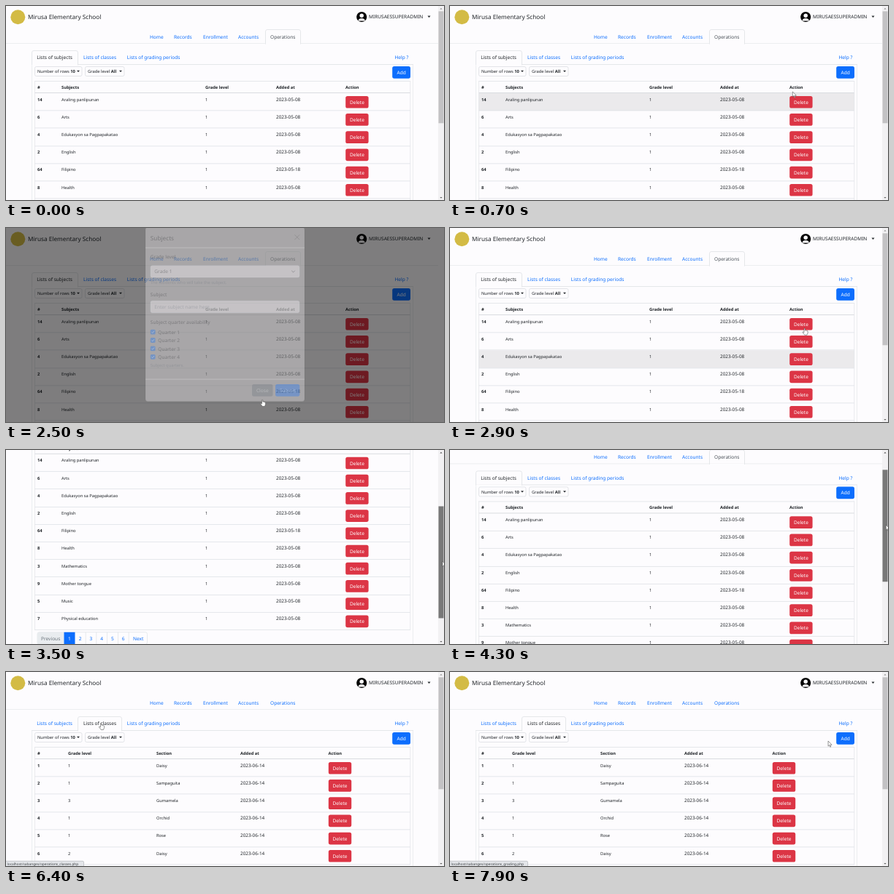
An HTML page with a canvas that plays this animation: 600 px wide and 267 px high, repeating every 8 s.

```html
<!DOCTYPE html>
<html lang="en">
<head>
<meta charset="utf-8">
<title>School records</title>
<style>
html, body { margin: 0; width: 100%; height: 100%; overflow: hidden; background: #fdfcfe; }
canvas { display: block; width: 600px; height: 267px; }
</style>
</head>
<body>
<canvas id="stage"></canvas>
<script>
const W = 600, H = 267, LOOP = 8000;
const canvas = document.getElementById('stage');
const dpr = window.devicePixelRatio || 1;
canvas.width = W * dpr;
canvas.height = H * dpr;
const c = canvas.getContext('2d');
c.textRendering = 'geometricPrecision';

const PAGE = '#fdfcfe', INK = '#212529', BLUE = '#0d6efd', RED = '#dc3545', GRAY = '#6c757d', LINE = '#e5e7ea';
const ROW = 24.2, TOP = 120, THUMB = 0.614;

const subjects = [
  [14, 'Araling panlipunan'], [6, 'Arts'], [4, 'Edukasyon sa Pagpapakatao'], [2, 'English'],
  [64, 'Filipino'], [8, 'Health'], [3, 'Mathematics'], [9, 'Mother tongue'], [5, 'Music'],
  [7, 'Physical education']
].map(([id, name]) => [id, name, 1, id === 64 ? '2023-05-18' : '2023-05-08']);

const classes = [[1, 'Daisy'], [1, 'Sampaguita'], [3, 'Gumamela'], [1, 'Orchid'], [1, 'Rose'], [2, 'Daisy']]
  .map(([grade, name], i) => [i + 1, grade, name, '2023-06-14']);

const tables = {
  subjects: { cols: [43, 76, 273, 370, 465], heads: ['#', 'Subjects', 'Grade level', 'Added at', 'Action'], rows: subjects },
  classes: { cols: [43, 85, 206, 321, 441.6], heads: ['#', 'Grade level', 'Section', 'Added at', 'Action'], rows: classes }
};

// Pointer path: time, x, y
const path = [
  [0, 290, 275], [100, 290, 275], [600, 455, 138], [700, 469, 118], [900, 535, 92], [1550, 535, 92],
  [1900, 420, 150], [2300, 351, 236], [2600, 351, 236], [2800, 445, 172], [2900, 485, 138],
  [3100, 597, 83], [3180, 597, 83], [3500, 598, 153], [3700, 598, 184], [3900, 598, 184],
  [4400, 597, 83], [4600, 597, 83], [4900, 380, 96], [5200, 93, 88.5], [5450, 93, 88.5],
  [5750, 130, 70], [7000, 130, 70], [7200, 200, 70], [7500, 225, 72], [7900, 518, 95], [8000, 522, 92]
];
const handTimes = [[880, 960], [2270, 2620], [2860, 2930], [5120, 5500], [5650, 7560]];

const clamp = v => Math.max(0, Math.min(1, v));
const span = (t, a, b) => clamp((t - a) / (b - a));
const within = (t, a, b) => t >= a && t < b;

function pointer(t) {
  const i = Math.max(1, path.findIndex(k => k[0] >= t));
  const a = path[i - 1], b = path[i], p = span(t, a[0], b[0]);
  return { x: a[1] + (b[1] - a[1]) * p, y: a[2] + (b[2] - a[2]) * p };
}

function text(s, x, y, color = INK, px = 16, weight = 400) {
  c.font = `${weight} ${px * 0.411}px "Noto Sans", "Open Sans", sans-serif`;
  c.fillStyle = color;
  c.fillText(s, x, y);
  return x + c.measureText(s).width;
}

function rect(x, y, w, h, color) {
  c.fillStyle = color;
  c.fillRect(x, y, w, h);
}

function box(x, y, w, h, r, fill, stroke) {
  c.beginPath();
  c.roundRect(x, y, w, h, r);
  if (fill) { c.fillStyle = fill; c.fill(); }
  if (stroke) { c.strokeStyle = stroke; c.lineWidth = 0.7; c.stroke(); }
}

function disc(x, y, r, color) {
  c.beginPath();
  c.arc(x, y, r, 0, 7);
  c.fillStyle = color;
  c.fill();
}

function poly(points, fill) {
  c.beginPath();
  points.forEach(([x, y]) => c.lineTo(x, y));
  c.closePath();
  c.fillStyle = fill;
  c.fill();
}

function stroke(points, color, width) {
  c.beginPath();
  points.forEach(([x, y], i) => i ? c.lineTo(x, y) : c.moveTo(x, y));
  c.strokeStyle = color;
  c.lineWidth = width;
  c.stroke();
}

const caret = (x, y) => poly([[x, y], [x + 4, y], [x + 2, y + 2.3]], INK);

function button(s, x, y, w, color) {
  box(x, y, w, 16.7, 2.6, color);
  c.textAlign = 'center';
  text(s, x + w / 2, y + 10.9, '#fff');
  c.textAlign = 'left';
}

function tab(x, y, w, h) {
  rect(x, y + h - 1, w, 2, PAGE);
  c.beginPath();
  c.moveTo(x + 0.5, y + h + 0.5);
  c.arcTo(x + 0.5, y + 0.5, x + 9, y + 0.5, 2.6);
  c.arcTo(x + w - 0.5, y + 0.5, x + w - 0.5, y + 9, 2.6);
  c.lineTo(x + w - 0.5, y + h + 0.5);
  c.strokeStyle = LINE;
  c.lineWidth = 1;
  c.stroke();
}

function header(active) {
  disc(16.3, 15.2, 10, '#d3bb45');
  text('Mirusa Elementary School', 30, 17.5, INK, 20);
  disc(487.2, 15, 7.1, '#050505');
  disc(487.2, 13.2, 2.7, PAGE);
  c.beginPath();
  c.ellipse(487.2, 20.6, 4.6, 3.5, 0, Math.PI, 0);
  c.fill();
  text('MIRUSAESSUPERADMIN', 497, 17.3);
  caret(577.5, 13.6);
  rect(0, 51, 592, 1, '#eceef0');
  if (active) tab(355, 32, 49, 20);
  [['Home', 197], ['Records', 230], ['Enrollment', 270], ['Accounts', 318], ['Operations', 362]]
    .forEach(([s, x], i) => text(s, x, 44.6, active && i === 4 ? '#495057' : BLUE));
}

function panel(view) {
  const first = view === 'subjects';
  rect(35, 80, 523, 1, LINE);
  rect(35, 81, 1, 312, '#eceef0');
  rect(557, 81, 1, 312, '#eceef0');
  rect(35, 393, 523, 1, LINE);
  if (first) tab(35, 61, 64, 20); else tab(98, 61, 61, 20);
  text('Lists of subjects', 42.2, 73.3, first ? INK : BLUE);
  text('Lists of classes', 106, 73.3, first ? BLUE : INK);
  text('Lists of grading periods', 165.8, 73.3, BLUE);
  text('Help ?', 532.5, 73.3, BLUE);
  for (const [x, w, label, value] of [[39, 65.5, 'Number of rows ', '10'], [108, 54.5, 'Grade level ', 'All']]) {
    box(x + 0.5, 83.5, w - 1, 13, 2, PAGE, '#d9dce0');
    const end = text(label, x + 4, 92.2, INK, 14);
    text(value, end, 92.2, INK, 14, 700);
    caret(x + w - 7.5, 88.8);
  }
  button('Add', 529.2, 83, 24.8, BLUE);
}

function table(view, hover, filled) {
  const { cols, heads, rows } = tables[view];
  heads.forEach((s, i) => text(s, cols[i], 114, INK, 14, 700));
  rect(39, 103, 515, 1, LINE);
  rect(39, 119, 515, 1, '#d9dcdf');
  if (!filled) return;
  rows.forEach((row, n) => {
    const y = TOP + n * ROW;
    if (n === hover) rect(39, y, 515, ROW, '#ebeaec');
    row.forEach((s, i) => text(String(s), cols[i], y + 10.6, INK, i === 3 ? 15.5 : 14, i ? 400 : 700));
    button('Delete', cols[4] + 0.2, y + 3.9, 31.4, RED);
    rect(39, Math.round(y + ROW) - 0.5, 515, 0.8, '#dee2e6');
  });
  const h = rows.length * ROW + 17;
  rect(39, 103, 0.8, h, LINE);
  rect(553.4, 103, 0.8, h, LINE);
}

function pager() {
  const y = 365, h = 16.7;
  box(43, y, 150.5, h, 2.6, PAGE, '#dee2e6');
  box(43, y, 37, h, [2.6, 0, 0, 2.6], '#e9ecef');
  rect(79.5, y, 15, h, BLUE);
  text('Previous', 48, y + 10.9, GRAY);
  for (let i = 0; i < 6; i++) {
    const x = 79.5 + i * 14.75;
    text(String(i + 1), x + 5.4, y + 10.9, i ? BLUE : '#fff');
    if (i) rect(x + 14.5, y, 0.7, h, '#dee2e6');
  }
  text('Next', 174, y + 10.9, BLUE);
}

function scrollbar(scroll, color) {
  rect(592, 0, 8, H, '#f2f1f3');
  rect(592.5, 7.3 + scroll * THUMB, 7, 154, color);
  poly([[594.4, 4.6], [597.6, 4.6], [596, 2.8]], scroll > 0 ? '#505050' : '#8c8c8c');
  poly([[594.4, 263], [597.6, 263], [596, 264.8]], '#606060');
}

function dialog(alpha, dy) {
  c.save();
  c.globalAlpha = alpha;
  c.translate(0, dy);
  box(191, 11.3, 218, 239.7, 3.5, PAGE, 'rgba(0,0,0,.25)');
  text('Subjects', 197.8, 29.3, INK, 20);
  stroke([[395.4, 21.6], [402.2, 28.4]], '#6b6b6b', 1);
  stroke([[402.2, 21.6], [395.4, 28.4]], '#6b6b6b', 1);
  rect(191, 39, 218, 1, LINE);
  rect(191, 220, 218, 1, LINE);

  text('Grade level', 197.8, 54.3);
  box(198, 64, 204, 16.3, 2.6, PAGE, '#ced4da');
  text('Grade 1', 203.3, 74.8);
  stroke([[391.2, 71], [393.5, 73.3], [395.8, 71]], '#343a40', 1);
  text('The students who will take the subject.', 197.8, 89, GRAY, 14);

  text('Subject', 197.8, 106.6);
  box(198, 112.6, 204, 16.4, 2.6, PAGE, '#ced4da');
  text('Enter subject name here ...', 203.3, 123.5, GRAY);

  text('Subject quarter availability', 197.8, 144.6);
  for (let i = 0; i < 4; i++) {
    const y = 152 + i * 11.4;
    box(197.8, y, 6.8, 6.8, 1.6, BLUE);
    stroke([[199.4, y + 3.5], [200.7, y + 4.8], [203, y + 2.1]], '#fff', 1);
    text('Quarter ' + (i + 1), 208.3, y + 6.4);
  }
  text('Subject quarters.', 197.8, 203.2, GRAY, 14);
  button('Close', 337, 227.3, 28.5, GRAY);
  button('Submit', 369, 227.3, 33.3, BLUE);
  c.restore();
}

function status(name) {
  box(-1, 260.3, 107.5, 9, [0, 1.5, 0, 0], '#e4e6ea', '#b4b7bb');
  text(`localhost/sabanges/operations_${name}.php`, 1.5, 265.6, '#3c4043', 11.7);
}

const ARROW = 'M0 0V16L3.7 12.6L6 18.4L8.4 17.4L6 11.8H11.2Z';
const HAND = 'M5 1.5Q6.5 0 8 1.5V7Q10 6 11 7.6Q13 7 13.7 8.6Q16 8 16.3 10V15L14 21H6.5L1 13.5Q0 11 2.4 11.4L5 13.5Z';

function drawPointer(t) {
  const { x, y } = pointer(t);
  const hand = handTimes.some(([a, b]) => within(t, a, b));
  const shape = new Path2D(hand ? HAND : ARROW);
  c.save();
  c.translate(x - (hand ? 2.8 : 0), y);
  c.scale(0.45, 0.45);
  c.fillStyle = '#fff';
  c.fill(shape);
  c.strokeStyle = '#444';
  c.lineWidth = 1.2;
  c.stroke(shape);
  c.restore();
}

function hoverRow(t) {
  if (!within(t, 0, 960) && !within(t, 2860, 3180)) return -1;
  const p = pointer(Math.max(0, t - 100));
  return p.x < 39 || p.x > 554 || p.y < TOP || p.y > H ? -1 : Math.floor((p.y - TOP) / ROW);
}

function draw(t) {
  const view = t < 6050 ? 'subjects' : 'classes';
  const filled = !within(t, 6050, 6300);
  const dragging = within(t, 3150, 4500);
  const scroll = dragging ? Math.max(0, Math.min(171, (pointer(t).y - 83) / THUMB)) : 0;

  c.setTransform(dpr, 0, 0, dpr, 0, 0);
  rect(0, 0, W, H, PAGE);
  c.save();
  c.translate(0, -scroll);
  header(view === 'subjects');
  panel(view);
  table(view, hoverRow(t), filled);
  if (view === 'subjects') pager();
  c.restore();

  const locked = within(t, 950, 2870);
  if (filled && !locked) {
    scrollbar(scroll, dragging ? '#787878' : within(t, 3080, 4620) ? '#a8a8a8' : '#c3c2c4');
  }

  if (locked) {
    const shade = span(t, 950, 1100) * (1 - span(t, 2720, 2870));
    rect(0, 0, W, H, `rgba(0,0,0,${0.5 * shade})`);
    const closing = span(t, 2400, 2700);
    const shown = 1 - (1 - span(t, 1100, 1380)) ** 2;
    const alpha = span(t, 1100, 1250) * (1 - span(t, 2400, 2550));
    if (alpha > 0) dialog(alpha, -22 * (1 - shown + closing * (2 - closing)));
  }

  if (within(t, 5680, 6050) || within(t, 6400, 7150)) status('classes');
  else if (t >= 7150) status('grading');
  drawPointer(t);
}

function tick(now) {
  draw(now % LOOP);
  requestAnimationFrame(tick);
}
requestAnimationFrame(tick);
</script>
</body>
</html>
```
